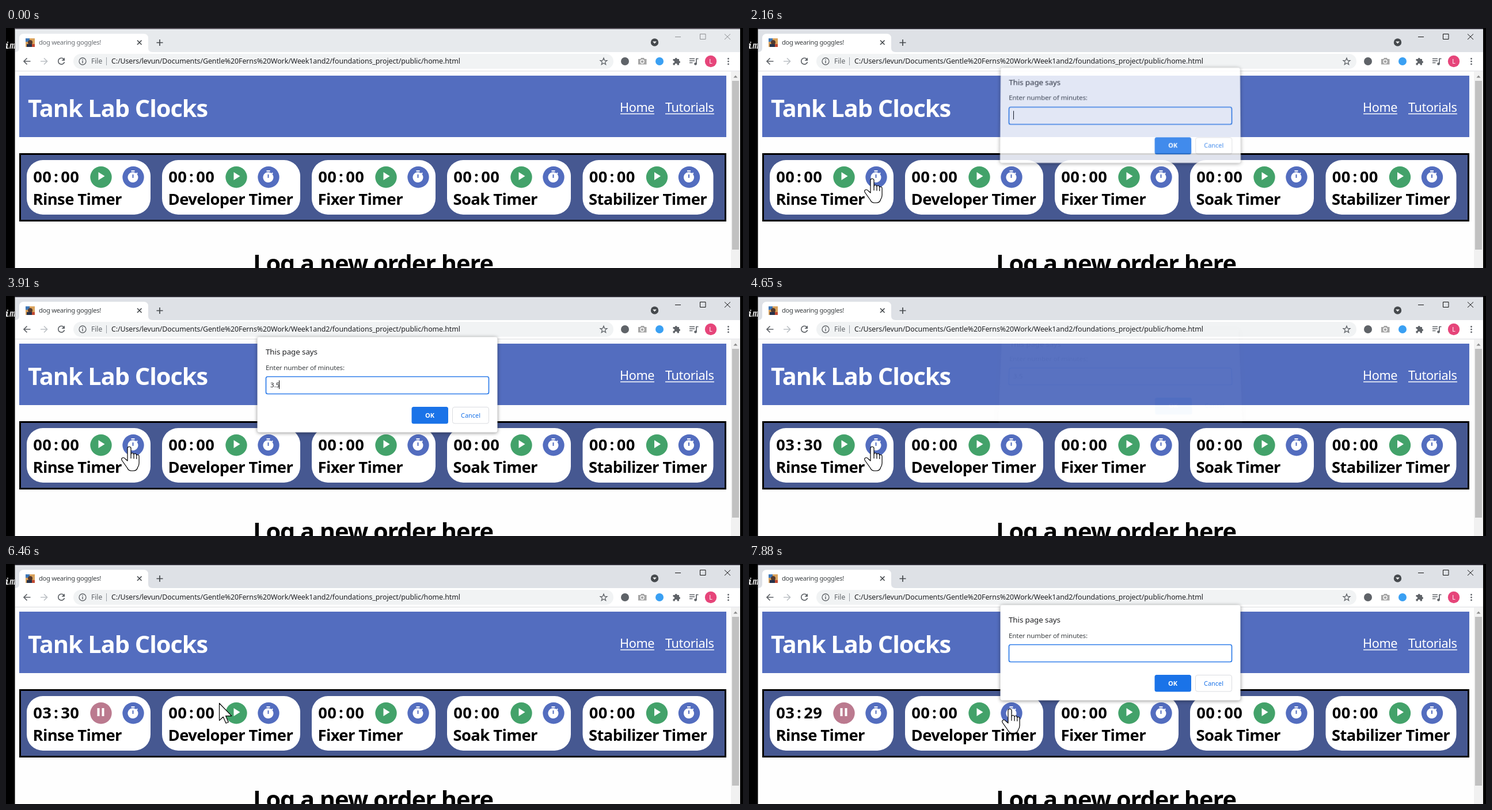
Write an HTML page that moves like this. It is 1280 px wide and 418 px high and loops after 8000 ms.

```html
<!DOCTYPE html>
<html lang="en">
<head>
<meta charset="utf-8">
<title>Timers</title>
<style>
  html, body { margin: 0; width: 100%; height: 100%; overflow: hidden; background: #000; }
  svg { position: absolute; left: 0; top: 0; }
  text { font-family: "Noto Sans", "Open Sans", sans-serif; white-space: pre; }
  .big { font-weight: 700; font-size: 41.5px; letter-spacing: -.025em; }
  .label { font-weight: 700; font-size: 27.4px; letter-spacing: -.022em; }
  .digit { font-weight: 700; font-size: 27.4px; text-anchor: middle; }
  .link { font-size: 21.7px; letter-spacing: -.4px; fill: #fff; }
  .url { font-size: 12.4px; letter-spacing: -.08px; fill: #202124; }
  .wall { font: italic 700 17px "Liberation Mono", monospace; fill: #e8e8e8; }
  .line { fill: none; stroke: #5f6368; stroke-width: 1.7; }
  #dialog { transform-origin: 645px 155px; filter: drop-shadow(0 1px 3px rgba(0,0,0,.45)); }
</style>
</head>
<body>
<svg id="stage" width="1280" height="418" viewBox="0 0 1280 418">
  <rect width="1280" height="418"/>
  <text class="wall" x="-4" y="36">im</text>
  <rect id="edge" x="15" width="1260" height="2"/>
  <rect x="15" y="2" width="1260" height="416" fill="#fefefe"/>
  <rect id="strip" x="16" y="2" width="1259" height="40"/>
  <rect x="15" y="2" width="1" height="416" fill="#777"/>

  <!-- tab strip -->
  <path d="M15.5 42q7.5 0 7.500-7V18q0-8 8-8H239q8 0 8 8V35q0 7 7.500 7z" fill="#fff"/>
  <g>
    <rect x="34" y="18" width="16" height="15" fill="#d9a25c"/>
    <rect x="34" y="18" width="7" height="6" fill="#3f78b8"/>
    <circle cx="42" cy="25" r="4" fill="#54392c"/>
    <rect x="36" y="28" width="9" height="5" fill="#26324a"/>
    <rect x="45" y="28" width="5" height="5" fill="#c24a32"/>
  </g>
  <text id="tab" x="57" y="29" font-size="11.2" letter-spacing="-.3">dog wearing goggles!</text>
  <path d="M228 21.5l7.500 7.500m0-7.500l-7.500 7.500" class="line" style="stroke:#45494d"/>
  <path d="M261.5 25.5h11m-5.500-5.500v11" class="line" style="stroke:#45494d"/>
  <circle cx="1126.5" cy="25" r="6.7" fill="#45494d"/>
  <path d="M1123.2 23.5h6.600l-3.300 3.800z" fill="#fff"/>
  <path id="controls" d="M1162 15.5h10M1205.5 10.5h9.500v9h-9.500zM1248 10.5l10 9.500m0-9.500l-10 9.500" fill="none"/>

  <!-- toolbar -->
  <rect x="16" y="42" width="1259" height="33" fill="#fff"/>
  <rect x="16" y="74.5" width="1259" height="1" fill="#dadce0"/>
  <rect x="117" y="45" width="938" height="26" rx="13" fill="#f1f3f4"/>
  <path d="M42.5 58H31m5.500-5.500L31 58l5.500 5.500" class="line"/>
  <path d="M60 58h11.500M66 52.5l5.500 5.500-5.500 5.500" class="line" style="stroke:#bdc1c6"/>
  <path d="M100.5 54.3a5.500 5.500 0 1 0 1 5" class="line"/>
  <path d="M102 51.5v5.500h-5.500z" fill="#5f6368"/>
  <circle cx="133" cy="58" r="6" class="line" style="stroke-width:1.3"/>
  <path d="M133 57v4.200m0-6.700v1.400" class="line" style="stroke-width:1.5"/>
  <text x="148" y="62" font-size="12" fill="#5f6368">File</text>
  <rect x="174" y="51" width="1" height="14" fill="#9aa0a6"/>
  <text class="url" x="183" y="62">C:/Users/levun/Documents/Gentle%20Ferns%20Work/Week1and2/foundations_project/public/home.html</text>
  <path id="star" class="line" style="stroke-width:1.3"/>
  <circle cx="1075" cy="58" r="7" fill="#5f6368"/>
  <path d="M1098 54h4l1-2h5l1 2h3.500v9.500H1098z" fill="#a5a5a5"/>
  <circle cx="1105" cy="58.5" r="3" fill="#a5a5a5" stroke="#fff" stroke-width="1.3"/>
  <circle cx="1135" cy="58" r="7" fill="#3aa0f3"/>
  <path d="M1158.5 54h3.200a2 2 0 1 1 4 0h3.300v3.200a2 2 0 1 1 0 4V64.5h-3.500a2 2 0 1 0-3.600 0h-3.400v-3.600a2 2 0 1 0 0-3.800z" fill="#5f6368"/>
  <path d="M1187 53.5h9m-9 3.500h9m-9 3.500h5.500m6.500 2V53.5h3.500" class="line"/>
  <circle cx="1197.5" cy="62.5" r="2.3" fill="#5f6368"/>
  <circle cx="1224" cy="58" r="10.2" fill="#e6457a"/>
  <text x="1224" y="62" font-size="10.5" fill="#fff" text-anchor="middle">L</text>
  <path d="M1254.5 53.5h.01m0 4.700h.01m0 4.700h.01" class="line" style="stroke-width:2.8;stroke-linecap:round"/>

  <!-- page -->
  <rect x="1259" y="76" width="16" height="342" fill="#f1f1f1"/>
  <rect x="1261" y="92" width="12" height="294" fill="#c1c1c1"/>
  <path d="M1263.5 86.5h7l-3.500-4z" fill="#8a8a8a"/>
  <rect x="23" y="83" width="1228" height="107" fill="#536dbf"/>
  <text class="big" x="38" y="154.7" fill="#fff">Tank Lab Clocks</text>
  <text class="link" x="1066" y="146">Home</text>
  <text class="link" x="1145" y="146">Tutorials</text>
  <path d="M1067 149.5h59M1145 149.5h85" stroke="#fff" stroke-width="1.5"/>
  <rect x="24.5" y="219.5" width="1225" height="116" fill="#465891" stroke="#000" stroke-width="3"/>
  <g id="cards"></g>
  <text class="big" x="429" y="424.7">Log a new order here</text>
</svg>

<svg id="dialog" width="1280" height="418" viewBox="0 0 1280 418">
  <rect x="436.5" y="71.5" width="417" height="166" rx="4" fill="#fff"/>
  <text x="451" y="102" font-size="13.4" letter-spacing="-.1" fill="#202124">This page says</text>
  <text x="451" y="128.5" font-size="11.6" letter-spacing="-.14" fill="#3c4043">Enter number of minutes:</text>
  <rect x="451.5" y="140.5" width="387" height="30" rx="3" fill="#fff" stroke="#2f7de9" stroke-width="1.7"/>
  <text id="entry" x="459" y="159" font-size="11.6" fill="#202124"></text>
  <rect id="caret" y="147" width="1" height="15" fill="#000"/>
  <rect x="704.5" y="193" width="63.5" height="29.5" rx="3.5" fill="#1a73e8"/>
  <text x="736" y="211.5" font-size="11" font-weight="600" fill="#fff" text-anchor="middle">OK</text>
  <rect x="775.5" y="193.5" width="63" height="28.5" rx="3.5" fill="#fff" stroke="#dadce0"/>
  <text x="807" y="211.5" font-size="10.9" font-weight="500" fill="#1a73e8" text-anchor="middle">Cancel</text>
</svg>

<svg width="1280" height="418" viewBox="0 0 1280 418">
  <g id="pointer" fill="#fff" stroke="#000" stroke-width="1.2" stroke-linejoin="round">
    <path id="arrow" d="M.5 .5V30.5L7.2 24.3L12 35.3L16.3 33.5L11.6 22.6H21.8Z"/>
    <g id="hand" transform="translate(-12 0)">
      <path d="M11 25V3.5q0-3 3-3t3 3V14q0-2.500 2.400-2.500t2.600 3q0-2 2.300-2t2.500 3.500q.2-1.500 2-1.500 2.300 0 2.300 3.500V29q0 4-2.400 7.500-1.500 6-8 6h-3q-5 0-7-5L1.800 25Q-.5 21.5 2 20q2.600-1.500 5 1.500z"/>
      <path d="M17 14v7m5-6v6.500m4.800-5v5.500" fill="none"/>
    </g>
  </g>
</svg>

<script>
const LOOP = 8000, TICK = 67;
const $ = id => document.getElementById(id);
const CARDS = [
  [36, 215, "Rinse"], [271, 240, "Developer"], [531, 215, "Fixer"],
  [766, 215, "Soak"], [1001.5, 227, "Stabilizer"]
];
const PLAY = "M8 5v14l11-7z";
const PAUSE = "M6 19h4V5H6zM14 5v14h4V5z";
const WATCH = "M15 1H9v2h6V1zM11 14h2V8h-2zm8-6.6l1.4-1.4q-.6-.8-1.4-1.4l-1.4 1.4A9 9 0 1 0 19 7.4z";

// Pointer path: time, x, y
const PATH = [
  [190, 1206, 402], [460, 800, 320], [700, 480, 262], [925, 334, 246],
  [1200, 250, 262], [1460, 199, 255], [1640, 199, 255], [1720, 212, 262],
  [5060, 212, 262], [5145, 193, 254], [5215, 180, 258], [5280, 173, 267],
  [6190, 173, 267], [6300, 255, 233], [6420, 370, 242], [6560, 370, 242],
  [6800, 400, 231], [7000, 440, 246], [7150, 451, 252]
];
const ENTRY = [[0, ""], [2960, "3"], [3380, "3."], [3910, "3.5"], [4900, ""]];
const CLOCK = [[0, "00:00"], [4580, "03:30"], [6660, "03:29"]];

const at = (steps, t) => steps.filter(s => s[0] <= t).pop()[1];
const ramp = (t, from, to) => Math.min(1, Math.max(0, (t - from) / (to - from)));

$("cards").innerHTML = CARDS.map(([x, w, name]) => `
  <rect x="${x}" y="230" width="${w}" height="95" rx="28" fill="#fff"/>
  ${[..."00:00"].map((c, i) => `<text class="digit" x="${x + 19 + i * 16}" y="269">${c}</text>`).join("")}
  <text class="label" x="${x + 10.5}" y="308">${name} Timer</text>
  <circle cx="${x + 129}" cy="259.8" r="18.7" fill="#43a26a"/>
  <path d="${PLAY}" transform="translate(${x + 116.5} 246)" fill="#fff"/>
  <circle cx="${x + 185}" cy="259.8" r="18.7" fill="#536dbf"/>
  <path d="${WATCH}" fill-rule="evenodd" transform="translate(${x + 172.5} 247)" fill="#fff"/>`).join("");

$("star").setAttribute("d", "M" + Array.from({ length: 10 }, (_, i) => {
  const r = i % 2 ? 2.7 : 6.3, a = i * Math.PI / 5;
  return `${1038 + r * Math.sin(a)} ${58.5 - r * Math.cos(a)}`;
}).join("L") + "Z");

const digits = [...document.querySelectorAll(".digit")].slice(0, 5);
const button = document.querySelector("#cards circle");
const symbol = document.querySelector("#cards path");

function pointerAt(t) {
  const q = 190 + Math.floor((t - 190) / TICK) * TICK;
  const i = PATH.findIndex(p => p[0] > q);
  if (i < 0) return PATH[PATH.length - 1].slice(1);
  const [t0, x0, y0] = PATH[Math.max(0, i - 1)], [t1, x1, y1] = PATH[i];
  const k = ramp(q, t0, t1);
  return [x0 + (x1 - x0) * k, y0 + (y1 - y0) * k];
}

function drawWindow(t) {
  const active = t >= 2030;
  $("edge").setAttribute("fill", active ? "#2c2a33" : "#5a555e");
  $("strip").setAttribute("fill", active ? "#dee1e6" : "#e7eaed");
  $("tab").setAttribute("fill", active ? "#3c4043" : "#6a6e73");
  $("controls").setAttribute("stroke", active ? "#111" : "#8d8f92");
}

function drawTimer(t) {
  const running = t >= 5620;
  [...at(CLOCK, t)].forEach((c, i) => digits[i].textContent = c);
  button.setAttribute("fill", running ? "#bb7a8f" : "#43a26a");
  symbol.setAttribute("d", running ? PAUSE : PLAY);
}

function drawDialog(t) {
  const shown = t < 4900
    ? ramp(t, 1960, 2200) * (1 - ramp(t, 4500, 4656))
    : ramp(t, 7350, 7550);
  const away = 1 - shown, style = $("dialog").style;
  style.opacity = shown;
  style.visibility = shown ? "visible" : "hidden";
  style.transform = away ? `perspective(1000px) translateY(${-16 * away}px) rotateX(${12 * away}deg)` : "none";
  const text = at(ENTRY, t);
  $("entry").textContent = text;
  $("caret").setAttribute("x", [459, 465, 468, 474][text.length]);
  const blink = (t >= 2700 && t < 2960) || (t >= 4440 && t < 4900) || t >= 7880;
  $("caret").style.display = blink ? "none" : "";
}

function drawPointer(t) {
  const [x, y] = pointerAt(t);
  const over = CARDS.some(c => [129, 185].some(d => Math.hypot(c[0] + d - x, 259.8 - y) < 18.7));
  $("pointer").style.display = t < 190 ? "none" : "";
  $("pointer").setAttribute("transform", `translate(${x} ${y})`);
  $("hand").style.display = over ? "" : "none";
  $("arrow").style.display = over ? "none" : "";
}

let start;
function frame(now) {
  start ??= now;
  const t = (now - start) % LOOP;
  drawWindow(t);
  drawTimer(t);
  drawDialog(t);
  drawPointer(t);
  requestAnimationFrame(frame);
}
requestAnimationFrame(frame);
</script>
</body>
</html>
```
